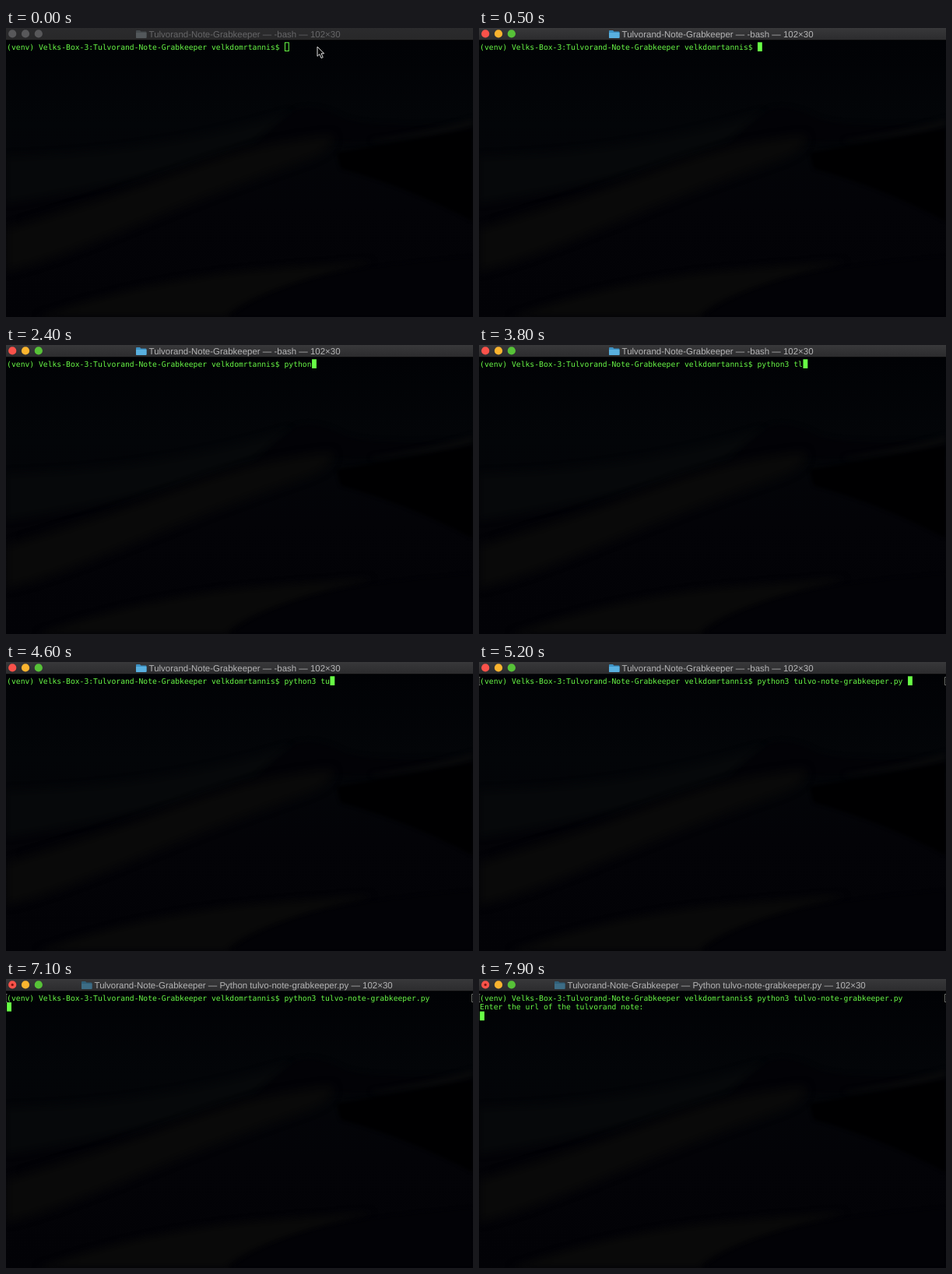
Write an HTML page with a canvas that moves like this. It is 600x371 px and loops after 8 s.

```html
<!DOCTYPE html>
<html lang="en">
<head>
<meta charset="utf-8">
<title>Terminal</title>
<style>
html, body { margin: 0; width: 100%; height: 100%; overflow: hidden; background: #020307; }
canvas { display: block; }
</style>
</head>
<body>
<canvas id="stage" width="600" height="371"></canvas>
<script>
const W = 600, H = 371, LOOP = 8000;
const COL = 5.85, ROW = 11.65, LEFT = 1.1, TOP = 18.3;
const GREEN = '#68f846';
const ctx = document.getElementById('stage').getContext('2d');

const project = 'Tulvorand-Note-Grabkeeper';
const script = 'tulvo-note-grabkeeper.py';
const prompt = `(venv) Velks-Box-3:${project} velkdomrtannis$ `;
const question = 'Enter the url of the tulvorand note:';

// [start in ms, text after the prompt]
const typing = [
  [0, ''], [1100, 'p'], [1400, 'py'], [1500, 'pyt'], [1600, 'pyth'],
  [2000, 'pytho'], [2300, 'python'], [2600, 'python3'], [2800, 'python3 '],
  [3800, 'python3 tl'], [4000, 'python3 t'], [4500, 'python3 tu'],
  [5000, 'python3 tul'], [5100, `python3 ${script} `]
];
const ACTIVE = 400, POINTER_OFF = 500, MARKED = 5200, RUNNING = 5900, ASKED = 7400;

function shape(path, fill, blur = 0) {
  ctx.filter = blur ? `blur(${blur}px)` : 'none';
  ctx.fillStyle = fill;
  ctx.fill(new Path2D(path));
  ctx.filter = 'none';
}

function disc(x, y, r, fill) {
  ctx.fillStyle = fill;
  ctx.beginPath();
  ctx.arc(x, y, r, 0, 7);
  ctx.fill();
}

function label(text, x, y, font, fill) {
  ctx.font = font;
  ctx.fillStyle = fill;
  ctx.fillText(text, x, y);
}

// Faint dunes showing through the window
function drawDunes() {
  const sky = ctx.createLinearGradient(0, 16, 0, H);
  sky.addColorStop(0, '#010205');
  sky.addColorStop(.3, '#030508');
  sky.addColorStop(.6, '#030307');
  sky.addColorStop(1, '#020206');
  ctx.fillStyle = sky;
  ctx.fillRect(0, 0, W, H);
  shape('M0 165Q200 160 365 108L350 128Q290 165 200 186T0 225Z', '#06080a', 5);
  shape('M20 245Q150 208 210 185T320 150Q350 120 375 104Q400 98 430 114T600 122V135Q500 150 425 145Q360 150 290 172T20 250Z', '#020206', 3);
  shape('M0 258Q120 222 230 182T420 138Q422 155 390 168Q270 210 160 256T0 312Z', '#090909', 6);
  shape('M470 144Q550 132 600 116V126Q550 142 470 146Z', '#08090a', 3);
  shape('M425 160Q510 146 600 130V248Q520 205 430 180Z', '#000001', 2);
  shape('M40 371Q180 322 330 310T470 301Q400 318 345 338T285 371Z', '#090909', 5);
  shape('M290 371Q330 340 400 322T600 294V371Z', '#020206', 2);
}

function drawFolder(x, back, front) {
  shape(`M${x} 4q0-1 1-1h4l1.5 1.5h6q1 0 1 1V12q0 1-1 1h-11.5q-1 0-1-1z`, back);
  shape(`M${x} 6h13.5v6q0 1-1 1h-11.5q-1 0-1-1z`, front);
}

function drawTitleBar(active, running) {
  const bar = ctx.createLinearGradient(0, 0, 0, 16);
  bar.addColorStop(0, active ? '#38383a' : '#2b2b2d');
  bar.addColorStop(1, active ? '#2b2b2d' : '#282829');
  ctx.fillStyle = bar;
  ctx.fillRect(0, 0, W, 15.5);
  ctx.fillStyle = '#000';
  ctx.fillRect(0, 15.5, W, .7);
  const lights = active ? ['#f9524a', '#fab42f', '#57c238'] : Array(3).fill('#58585a');
  lights.forEach((fill, i) => disc(8.2 + 16.8 * i, 7.4, 5.1, fill));
  if (running) disc(8.2, 7.4, 1.6, '#7e150f');
  const x = running ? 97 : 167;
  if (running) drawFolder(x, '#2f5f78', '#3d6c85');
  else if (active) drawFolder(x, '#3d92c4', '#59b0df');
  else drawFolder(x, '#454a4d', '#53585b');
  label(`${project} — ${running ? 'Python ' + script : '-bash'} — 102×30`, x + 16.6, 11.7,
    '11.48px "Liberation Sans", Arial, sans-serif', active ? '#b5b5b6' : '#666668');
}

function terminalLine(text, row) {
  label(text, LEFT, TOP + 9.2 + row * ROW, '9.717px "DejaVu Sans Mono", monospace', GREEN);
}

function drawCursor(col, row, solid) {
  const x = LEFT + col * COL, y = TOP + row * ROW;
  ctx.fillStyle = ctx.strokeStyle = '#68ff46';
  ctx.lineWidth = 1;
  if (solid) ctx.fillRect(x, y, COL, ROW);
  else ctx.strokeRect(x + .5, y + .5, COL - 1, ROW - 1);
}

function drawMarks() {
  ctx.strokeStyle = '#6c6f6a';
  ctx.lineWidth = 1;
  ctx.stroke(new Path2D('M1.5 19.5H0V29.5H1.5M600 19.5H598.5V29.5H600'));
}

function drawPointer() {
  const arrow = new Path2D('M400 24v12.3l2.8-2.7 2.2 5 2.2-1-2.2-4.8h3.6z');
  ctx.fillStyle = '#050505';
  ctx.fill(arrow);
  ctx.strokeStyle = '#e4e4e4';
  ctx.lineWidth = 1;
  ctx.stroke(arrow);
}

drawDunes();
const dunes = document.createElement('canvas');
dunes.width = W;
dunes.height = H;
dunes.getContext('2d').drawImage(ctx.canvas, 0, 0);
ctx.textRendering = 'geometricPrecision';

function draw(t) {
  const typed = typing.findLast(([start]) => t >= start)[1];
  const row = t >= ASKED ? 2 : t >= RUNNING ? 1 : 0;
  ctx.drawImage(dunes, 0, 0);
  drawTitleBar(t >= ACTIVE, t >= RUNNING);
  terminalLine(prompt + typed, 0);
  if (t >= ASKED) terminalLine(question, 1);
  drawCursor(row ? 0 : (prompt + typed).length, row, t >= ACTIVE);
  if (t >= MARKED) drawMarks();
  if (t < POINTER_OFF) drawPointer();
}

const begin = performance.now();
function tick() {
  draw((performance.now() - begin) % LOOP);
  requestAnimationFrame(tick);
}
tick();
</script>
</body>
</html>
```
